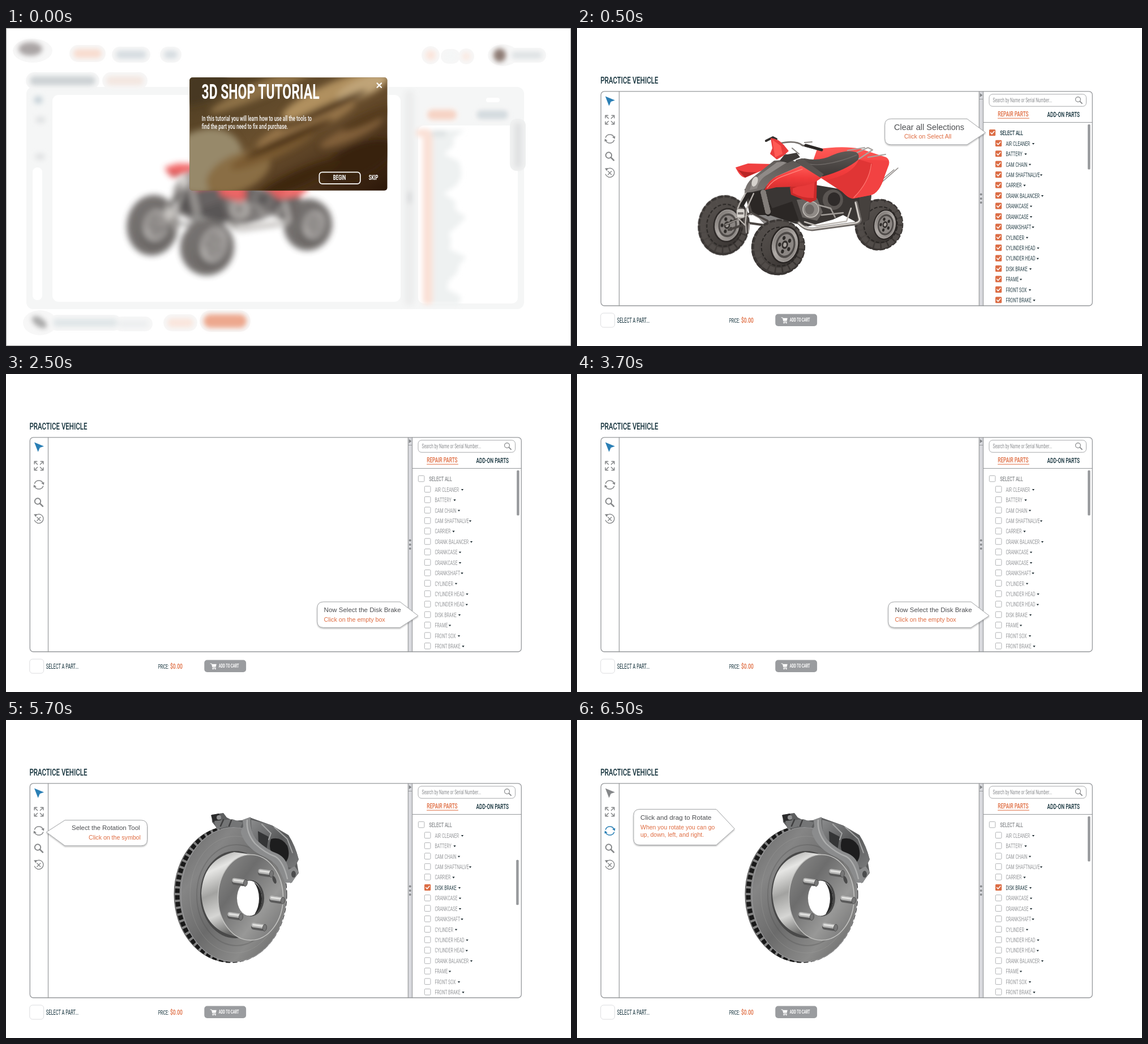
These frames come from a looping animation (998x561 px, 8 s). An HTML page:

```html
<!DOCTYPE html>
<html lang="en">
<head>
<meta charset="utf-8">
<title>3D shop tutorial</title>
<style>
html, body { margin: 0; width: 100%; height: 100%; overflow: hidden; background: #fff; }
svg { display: block; width: 100vw; height: 100vh; }
text { font-family: "Liberation Sans", Arial, sans-serif; white-space: pre; }
.slim, .mid, .bold { font-family: Roboto, "Open Sans", sans-serif; }
.mid { font-weight: 500; }
.bold { font-weight: 700; }
</style>
</head>
<body>
<svg id="stage" viewBox="0 0 998 561" preserveAspectRatio="none"></svg>
<script>
const LOOP = 8000;
const CUTS = [0, 500, 2500, 4500, 6500];
const INK = '#12303a', GRAY = '#96989b', LINE = '#97999c', ORANGE = '#df6c41', BLUE = '#2a7fb5';
const NARROW = { slim: .6, mid: .66, bold: .63 };   // condensed cuts of one face

const text = (x, y, size, str, fill, face = '') => {
  const k = NARROW[face] || 1;
  return `<text class="${face}" transform="translate(${x} ${y}) scale(${k} 1)" font-size="${size}" fill="${fill}">${str}</text>`;
};
const rect = (x, y, w, h, r, fill, stroke = 'none', sw = 1) =>
  `<rect x="${x}" y="${y}" width="${w}" height="${h}" rx="${r}" fill="${fill}" stroke="${stroke}" stroke-width="${sw}"/>`;
const oval = (cx, cy, rx, ry, fill, extra = '') =>
  `<ellipse cx="${cx}" cy="${cy}" rx="${rx}" ry="${ry}" fill="${fill}" ${extra}/>`;
const shape = (d, fill, extra = '') => `<path d="${d}" fill="${fill}" ${extra}/>`;
const line = (d, color, w = 1, extra = '') =>
  `<path d="${d}" fill="none" stroke="${color}" stroke-width="${w}" stroke-linecap="round" stroke-linejoin="round" ${extra}/>`;
const group = (body, attrs = '') => `<g ${attrs}>${body}</g>`;
const grad = (id, dir, ...stops) =>
  `<linearGradient id="${id}" ${dir}>${stops.map((c, i) =>
    `<stop offset="${i / (stops.length - 1)}" stop-color="${c}"/>`).join('')}</linearGradient>`;
const blur = (id, s) =>
  `<filter id="${id}" x="-50%" y="-50%" width="200%" height="200%"><feGaussianBlur stdDeviation="${s}"/></filter>`;

// ---------- quad bike ----------
function wheel(cx, cy, rx, ry, tilt, dx, dy, hx, hy) {
  const ring = (k, w, dash, c) =>
    oval(cx + dx * (1 - k), cy + dy * (1 - k), rx * k, ry * k, 'none',
      `stroke="${c}" stroke-width="${w}" stroke-dasharray="${dash}"`);
  const x = cx + dx, y = cy + dy;
  let spokes = '';
  for (let i = 0; i < 5; i++) {
    const a = i * Math.PI * .4 + .5;
    spokes += oval(x + Math.cos(a) * hx * .42, y + Math.sin(a) * hy * .42, hx * .12, hy * .12, '#2d2a28');
  }
  return group(
    oval(cx, cy, rx, ry, 'url(#rubber)') +
    ring(.96, 5, '9 3', '#3b3735') + ring(.84, 9, '10 2.5', '#514c49') + ring(.7, 2, '6 3', '#2a2725') +
    oval(x, y, hx * 1.16, hy * 1.12, '#2b2725') +
    oval(x, y, hx, hy, 'url(#rim)', 'stroke="#a8a3a0" stroke-width="1.4"') +
    oval(x + 1, y, hx * .78, hy * .78, '#4e4a48') +
    oval(x + 1, y, hx * .64, hy * .64, '#8b8683') + spokes +
    oval(x, y, hx * .25, hy * .25, '#34302e') + oval(x, y, hx * .13, hy * .13, '#aaa5a1'),
    `transform="rotate(${tilt} ${cx} ${cy})"`);
}

const quad =
  line('M567 247L528 281M560 250L520 283', '#8d8885', 1.6) +
  wheel(259, 348, 45, 53, 8, 6, -1, 21, 27) +
  wheel(533, 347, 42, 45, 10, 11, -2, 18, 24) +
  // frame and engine
  shape('M296 284L380 270L470 285L520 295L516 338L500 346L470 330L452 338L408 350L385 345L340 330L305 330Z', '#3a3634') +
  shape('M498 296L520 294L514 338L502 347L492 343L500 320Z', '#46413e') +
  shape('M300 292L330 286L345 318L380 306L392 340L330 345L308 322Z', '#1f1c1b', 'opacity=".55"') +
  oval(452, 303, 18, 18, '#5a5552') + oval(454, 302, 11, 12, '#2f2b2a') +
  shape('M388 303L424 300L434 325L424 340L398 334Z', '#6a6562') +
  oval(413, 320, 14, 14, '#8f8a86', 'stroke="#c1bcb7" stroke-width="1.5"') + oval(411, 320, 8, 9, '#6d6865') +
  line('M425 312L448 318L456 334M432 330L470 326', '#a19c98', 2.5) +
  line('M392 344Q404 357 418 355L492 345Q503 342 499 334L493 308', '#6f6a67', 6) +
  line('M392 344Q404 356 418 354L492 344Q502 341 498 334L492 308', '#d6d1cc', 2.6) +
  line('M402 342L424 349L476 341L484 318', '#c0bbb6', 2.5) +
  // suspension and bumper
  line('M262 347L308 326L336 340L362 372M268 356L304 344L332 348M308 326L298 292', '#4a4542', 4) +
  line('M262 347L308 328L334 342', '#9b9692', 1.4) +
  line('M329 290L338 327', '#24211f', 10) + line('M329 290L338 327', '#827d79', 10, 'stroke-dasharray="1.4 3.4" stroke-linecap="butt"') +
  line('M303 292L291 313', '#2a2725', 7) +
  line('M303 284Q291 300 284 318L283 334L297 348L300 318L312 292', '#b9b4af', 2.4) +
  rect(282, 319, 14, 16, 3, '#d9d5d0', '#8d8885') + rect(284, 325, 10, 4, 1, '#77726f') +
  line('M298 347L299 361M304 345L303 360', '#a8a39f', 2) +
  // rear bodywork
  shape('M424 214Q468 207 500 213L546 228Q553 232 551 241L543 262Q534 292 518 295L487 301Q478 300 470 290L430 264L410 254Z', 'url(#red)') +
  shape('M498 232L551 234L543 262Q534 292 518 295L487 301Q476 298 466 286L462 270Q488 258 498 232Z', '#f24242') +
  shape('M498 232L522 239Q516 270 487 301Q474 296 464 284L440 268Q486 260 498 232Z', '#e03535') +
  line('M520 240Q516 272 489 299', '#ff7771', 1.3) +
  line('M490 222L514 211L522 215L498 231M478 216L508 211M514 228L545 223', '#a9a4a0', 2.2) +
  shape('M384 237Q388 230 402 230Q428 236 452 224Q476 214 493 219Q501 224 496 233Q476 250 434 262Q420 258 411 249Q396 245 384 237Z', 'url(#seat)') +
  line('M390 234Q412 244 438 240Q466 236 494 224', '#6e6966', 1.4) +
  // front bodywork
  shape('M376 281L424 260L423 303L412 308L378 294Z', '#c92a2a') +
  shape('M381 283L420 268L418 300Q396 300 381 291Z', '#e83a3a') +
  shape('M280 246L302 239L346 240L330 250L297 264Q288 263 280 246Z', '#f04040') +
  shape('M284 250L297 264L318 254Q298 256 284 250Z', '#b92626') +
  shape('M348 234L378 232L398 242L352 262Q339 270 331 284L311 289L296 291Q297 274 314 261Z', 'url(#hood)') +
  shape('M353 237L374 235L338 258Q322 266 318 283L305 286Q308 270 322 260Z', '#8f8a87') +
  oval(314, 271, 5, 9, '#d6d2cd', 'transform="rotate(20 314 271)"') +
  shape('M331 286Q338 268 354 261L396 243L424 256L432 264Q416 278 388 280L352 281Z', 'url(#red)') +
  line('M336 282Q346 268 362 262L398 249', '#ff8079', 1.4) +
  shape('M386 233L398 230L436 258L430 264L398 244Z', '#595451') +
  // controls
  line('M356 204Q386 197 398 207L424 213', '#77726e', 3) + line('M404 207L432 215', '#2c2826', 5) +
  line('M334 199L346 193L352 196', '#33302e', 4) +
  line('M380 212L392 222M366 222L384 230M402 202L415 201', '#8a8581', 2) +
  shape('M342 194Q355 195 365 206L374 217L365 225L353 232L341 222L345 212Z', '#ea3c3c') +
  shape('M345 197L360 208L363 222L350 228L347 212Z', '#ff5a54') +
  shape('M366 224L388 220L394 228L372 238L358 234Z', '#3e3a38') +
  wheel(355, 387, 47, 49, 12, 11, -7, 22, 30);

// ---------- disc and caliper ----------
function stud(x, y) {
  return group(rect(-13, -6, 25, 12, 5, '#5a5a5a') + rect(-13, -6, 24, 8, 4, '#b5b5b4') +
    rect(-11, -4, 20, 3, 1.5, '#e2e2e0') + oval(11, 0, 3.5, 6, '#777', 'stroke="#484848" stroke-width=".8"'),
    `transform="translate(${x} ${y}) rotate(8)"`);
}
const disc =
  oval(394, 307.5, 97, 119.5, '#838383', 'stroke="#555" stroke-width="1"') +
  oval(397.5, 307.5, 95, 117, 'none', 'stroke="#191919" stroke-width="8" stroke-dasharray="8 4"') +
  // caliper body behind the rotor face
  shape('M363 167L384 164L390 172L402 178L424 176L431 172L470 186L499 203Q511 222 517 246L514 252L517 270L503 288L480 270L440 240L400 200L372 190L364 180Z', '#5d5e5f') +
  shape('M362 168L376 165L380 180L366 180Z', '#2b2b2c') +
  oval(402, 308, 93, 118.5, 'url(#steel)', 'stroke="#98989a" stroke-width="1.2"') +
  oval(405, 308, 80, 103, 'none', 'stroke="#a3a3a2" stroke-width="1" opacity=".35"') +
  oval(407, 309, 70, 89, 'none', 'stroke="#454545" stroke-width="2" opacity=".25"') +
  // hub
  oval(405, 308, 62, 77, '#494949') +
  shape('M403 233Q348 246 345 306Q348 368 402 381L432 388.5V237Z', 'url(#hub)') +
  oval(432, 313, 57.5, 75.5, 'url(#cap)', 'stroke="#c2c2c0" stroke-width="1.6"') +
  oval(432, 314.5, 24, 32, '#484848') + oval(430, 314.5, 22, 31, '#fff') +
  shape('M438 286Q452 296 452 315Q452 334 439 343Q447 330 447 315Q447 298 438 286Z', '#292929') +
  stud(412, 286) + stud(458, 270) + stud(478, 317) + stud(404, 346) + stud(446, 365) +
  oval(474, 282, 3, 7, '#4a4a4a', 'transform="rotate(-20 474 282)"') +
  // caliper front
  shape('M433 176L470 186L499 204Q511 222 517 246L508 262L492 258L470 240L452 228Q432 210 433 176Z', 'url(#cast)') +
  shape('M468 210Q486 205 497 222Q503 240 494 251Q480 246 468 232Q464 222 468 210Z', '#1d1d1e') +
  shape('M445 196L464 206L460 230L446 218Z', '#343536') +
  line('M452 184L468 200L464 211M474 189L497 210L506 234', '#a5a6a6', 2) +
  shape('M368 178L400 175L418 181L414 190L390 188L372 193Z', '#747576') +
  line('M384 176L379 187M398 177L394 187', '#3e3e3f', 2.5) +
  shape('M418 176L432 171Q430 196 443 212Q462 230 480 236Q496 244 499 264L510 258L517 268L505 287L493 287Q486 272 480 260Q470 246 449 238Q424 224 416 202Q413 196 419 188Z', '#8b8c8d') +
  line('M426 177Q424 199 440 218Q458 235 476 241Q490 250 497 280', '#adaeae', 2.4) +
  oval(508, 272, 4, 6, '#4c4d4e') + oval(376, 172, 4, 4, '#909192');

// ---------- shop screen ----------
const cursor = c => shape('M50 120.5L67 127.5L59.8 130L56.6 137.5Z', c);
const spin = c =>
  line('M50.6 193Q52.5 188 58 188Q63 188 65 192M65.6 198Q63.5 203 58 203Q53 203 51 199', c, 1.6) +
  shape('M62.2 192.4L67.4 190.8L67 195.8Z', c) + shape('M53.8 198.6L48.6 200.2L49 195.2Z', c);
const lens = (x, y, r, w, reach) =>
  `<circle cx="${x}" cy="${y}" r="${r}" fill="none" stroke="#858789" stroke-width="${w}"/>` +
  line(`M${x + r * .75} ${y + r * .75}l${reach} ${reach}`, '#858789', w * 1.4);
const corners = [[-1, -1], [1, -1], [-1, 1], [1, 1]].map(([a, b]) => line(
  `M${58 + a * 2.5} ${162 + b * 2.5}L${58 + a * 7.5} ${162 + b * 7.5}M${58 + a * 3.2} ${162 + b * 7.7}H${58 + a * 7.8}V${162 + b * 3.2}`,
  '#858789', 1.5)).join('');

const shop =
  text(41.5, 98, 17.4, 'PRACTICE VEHICLE', INK, 'mid') +
  rect(710, 112, 7.5, 378, 0, '#d9dade') +
  line('M74.5 112V490M710.3 112V490M717.5 112V490M717.5 166.5H910', LINE, 1.2) +
  line('M710.5 125.5H717', LINE, 1) + shape('M711.8 115L716.2 118.5L711.8 122Z', '#7f8184') +
  [293.5, 301, 308].map(y => oval(713.7, y, 1.9, 1.9, '#85878a')).join('') +
  rect(42.3, 111.8, 868, 378.2, 6, 'none', LINE, 1.3) +
  corners + lens(56, 224.5, 5.2, 1.9, 5) +
  line('M51.5 250.5A8 8 0 1 1 50.4 258M54.8 252.8l6 6m0-6l-6 6', '#858789', 1.3) +
  shape('M49 247.5L54.5 247L53 252.3Z', '#858789') +
  rect(728, 116.8, 171.5, 21.4, 6, '#fff', '#a7a9ab') +
  text(734.5, 131, 11.1, 'Search by Name or Serial Number...', '#8b8d90', 'slim') +
  lens(885, 126, 4.4, 1.2, 3.8) +
  text(743.3, 156, 12.5, 'REPAIR PARTS', ORANGE, 'mid') + line('M743.5 159.2H798.5', ORANGE, 1) +
  text(830.6, 157, 12.5, 'ADD-ON PARTS', INK, 'mid') +
  rect(41.8, 503, 24.8, 25, 5, '#fff', '#dcdddf') +
  text(70.8, 520, 12.4, 'SELECT A PART...', INK, 'slim') +
  text(268.8, 520, 10.4, 'PRICE:', INK, 'slim') + text(290, 520, 13, '$0.00', ORANGE, 'mid') +
  rect(350.3, 504.6, 73.8, 21.4, 5, '#9a9c9f') +
  line('M361 511H363.2L365 517.6H370.4M364.6 519.6H370.6', '#fff', 1) + shape('M363.6 511.8H371.8L370.6 516.4H365Z', '#fff') +
  oval(365.6, 520.2, 1, 1, '#fff') + oval(369.8, 520.2, 1, 1, '#fff') +
  text(375.8, 518.4, 9, 'ADD TO CART', '#fff', 'bold');

// label and x of its arrow
const PARTS = [['AIR CLEANER', 806], ['BATTERY', 792.5], ['CAM CHAIN', 800], ['CAM SHAFTNALVE', 820], ['CARRIER', 790.5],
  ['CRANK BALANCER', 822], ['CRANKCASE', 802], ['CRANKCASE', 802], ['CRANKSHAFT', 805.5], ['CYLINDER', 795],
  ['CYLINDER HEAD', 814.5], ['CYLINDER HEAD', 813.8], ['DISK BRAKE', 801], ['FRAME', 784], ['FRONT SOX', 800], ['FRONT BRAKE', 807.5]];
const swapped = PARTS.slice();
[swapped[5], swapped[12]] = [PARTS[12], PARTS[5]];

const box = (x, y, on) => on
  ? rect(x - 5.6, y - 5.6, 11.2, 11.2, 1.5, '#dc6d45') + line(`M${x - 3} ${y}l2.2 2.4l4.2-4.8`, '#fff', 1.5)
  : rect(x - 5.3, y - 5.3, 10.6, 10.6, 1.5, '#fff', '#b0b2b4');
const list = (items, all, isOn) =>
  box(733.6, 184.6, all) + text(747.3, 188.8, 11.2, 'SELECT ALL', all ? INK : '#85888b', 'mid') +
  items.map(([name, x], i) => {
    const y = 203.3 + i * 18.43, on = isOn(i);
    return box(744.6, y, on) + text(757.4, y + 4.4, 11.7, name, on ? '#2b444c' : GRAY, 'slim') +
      shape(`M${x - 2.2} ${y - .4}h4.4l-2.2 2.8z`, '#1d2b30');
  }).join('');
const bar = (x, y) => rect(x, y, 4.4, 79.5, 1.5, '#97999c');

function tip(flat, neck, top, end, px, py, lines) {
  const d = Math.sign(neck - flat) * 11, r = 11;
  return shape(`M${neck} ${top}H${flat + d}Q${flat} ${top} ${flat} ${top + r}V${end - r}Q${flat} ${end} ${flat + d} ${end}H${neck}L${px} ${py}Z`,
    '#fff', 'stroke="#a3a5a7" stroke-width="1" stroke-linejoin="round" filter="url(#drop)"') +
    lines.map(([x, y, size, str], i) => text(x, y, size, str, i ? ORANGE : '#4c4e51')).join('');
}

// ---------- opening screen ----------
// centre x, centre y, width, height, tone
const BLOBS = [
  [144, 45, 46, 12, '#f8dccf'], [221, 47, 50, 10, '#d5dce0'], [291, 47, 20, 10, '#d5dce0'],
  [750, 48, 14, 14, '#fbe4da'], [785, 50, 16, 8, '#f4f6f6'], [813, 50, 10, 10, '#fbe8e0'],
  [920, 48, 50, 8, '#dde1e3'], [100, 93, 112, 12, '#ccd1d4'], [210, 93, 62, 12, '#f3e6e0'],
  [770, 153, 48, 14, '#f6d3c4'], [859, 153, 52, 12, '#d3dade'],
  [140, 520, 110, 10, '#dfe5e7'], [225, 522, 50, 8, '#eceeef'], [308, 520, 42, 12, '#f9e5dc'],
  [387, 517, 72, 20, '#eda88e']];
const bar2 = ([x, y, w, h, c], grow) =>
  rect(x - w / 2 - grow, y - h / 2 - grow, w + 2 * grow, h + 2 * grow, h / 2 + grow, c);

let ragged = 'M752 180';
for (let y = 180; y <= 488; y += 14) ragged += `L${794 + 14 * Math.sin(y * .08) + 8 * Math.sin(y * .19)} ${y}`;
ragged += 'L752 488Z';

const backdrop =
  rect(36, 104, 879, 392, 12, '#f5f6f6') +
  rect(82, 118, 615, 365, 11, '#fff') + rect(47, 246, 17, 234, 8, '#fff') +
  rect(728, 172, 176, 314, 10, '#fff') + rect(848, 123, 24, 8, 4, '#fff') +
  oval(47, 40, 35, 21, '#f7f7f7') + oval(60, 520, 30, 22, '#f7f7f7') + oval(878, 48, 27, 19, '#f7f7f7') +
  BLOBS.map(b => bar2([b[0], b[1], b[2], b[3], '#f7f7f7'], 9)).join('') +
  rect(890, 160, 28, 92, 12, '#f0f1f1') +
  group(
    rect(704, 110, 17, 380, 8, '#eceded') + shape(ragged, '#eef1f1') +
    rect(736, 180, 18, 308, 8, '#fae1d7') + rect(724, 178, 26, 14, 7, '#fae1d7') + rect(752, 181, 26, 11, 5, '#dfe3e4') +
    rect(898, 167, 13, 80, 6, '#e0e1e2') + rect(709, 288, 8, 22, 4, '#d9dadc') +
    oval(57, 127, 8, 7, '#c9d4da') + oval(61, 162, 9, 6, '#e0e2e3') + oval(60, 227, 9, 6, '#e0e2e3') +
    oval(43, 37, 21, 12, '#aaa5a5') + oval(872, 48, 11, 12, '#8d7c75') +
    oval(59, 519, 15, 8, '#aaa', 'transform="rotate(35 59 519)"') +
    BLOBS.map(b => bar2(b, 2)).join(''), 'filter="url(#soft)"') +
  '<use href="#quad" filter="url(#haze)" opacity=".78"/>' +
  rect(.5, .5, 997, 560, 0, 'none', '#a2a2a2');

// x, y, rx, ry, tone of the dust clouds
const DUST = [
  [350, 235, 70, 55, '#97896b'], [410, 255, 60, 32, '#8a6e45'], [470, 100, 120, 14, '#8d7146'],
  [575, 118, 95, 20, '#b0905f'], [630, 105, 50, 16, '#c0a478'], [530, 170, 95, 17, '#96754a'],
  [470, 215, 80, 14, '#7c5b32'], [610, 185, 60, 12, '#82603a'], [560, 145, 85, 7, '#51381c'],
  [500, 195, 85, 7, '#4b3116'], [640, 160, 50, 9, '#553a1d'], [620, 235, 70, 28, '#38200e'],
  [520, 265, 80, 14, '#3d2611'], [345, 105, 50, 24, '#463922']];
const modal =
  group(rect(324, 87, 350, 200, 0, 'url(#dust)') +
    group(DUST.map(([x, y, a, b, c]) => oval(x, y, a, b, c, `transform="rotate(-24 ${x} ${y})"`)).join(''), 'filter="url(#smoke)"'),
    'clip-path="url(#card)"') +
  text(345.5, 124.5, 36.4, '3D SHOP TUTORIAL', '#fff', 'bold') +
  text(345.8, 164.3, 12.3, 'In this tutorial you will learn how to use all the tools to', '#fff', 'mid') +
  text(345.8, 178.2, 12.3, 'find the part you need to fix and purchase.', '#fff', 'mid') +
  line('M655.6 97.4l7.4 7.4m0-7.4l-7.4 7.4', '#fff', 2.2) +
  rect(553.4, 254.4, 72.4, 20.4, 5, 'none', '#fff', 1.7) +
  text(577.8, 268.4, 12.4, 'BEGIN', '#fff', 'bold') + text(640.8, 268.4, 12.1, 'SKIP', '#fff', 'bold');

const defs = '<defs>' +
  blur('soft', 4) + blur('haze', 5.5) + blur('smoke', 6) +
  '<filter id="drop" x="-10%" y="-20%" width="120%" height="150%"><feDropShadow dx="0" dy="1.5" stdDeviation="1.3" flood-opacity=".28"/></filter>' +
  '<clipPath id="card"><rect x="324.3" y="87.2" width="349.2" height="199.6" rx="5"/></clipPath>' +
  grad('rubber', 'x1="0" y1="0" x2="1" y2="1"', '#5b5653', '#4a4542', '#2c2826') +
  grad('rim', 'x1="0" y1="0" x2="1" y2="1"', '#6b6663', '#b0aba7', '#7b7673') +
  grad('red', 'x1="0" y1="0" x2="0" y2="1"', '#ff5b57', '#f13b3b', '#d42f2f') +
  grad('seat', 'x1="0" y1="0" x2="0" y2="1"', '#5f5a57', '#3b3735') +
  grad('hood', 'x1="0" y1="1" x2="1" y2="0"', '#7d7875', '#5a5552') +
  grad('steel', 'x1="0" y1="0" x2="1" y2="1"', '#686868', '#858585', '#6b6b6b', '#8b8b8a', '#5d5d5d') +
  grad('hub', 'x1="0" y1="0" x2=".25" y2="1"', '#8a8a89', '#e6e6e4', '#a2a2a0', '#d6d6d4', '#6b6b6a') +
  grad('cap', 'x1="0" y1="0" x2="1" y2="1"', '#8d8d8c', '#6d6d6d', '#989897', '#6f6f6f') +
  grad('cast', 'x1="0" y1="0" x2="1" y2="1"', '#8a8b8c', '#58595a', '#7a7b7c') +
  grad('dust', 'x1="0" y1="0" x2="1" y2="1"', '#4a3a20', '#6d5230', '#2b1608') +
  group(quad, 'id="quad"') + '</defs>';

// each layer lists the steps in which it shows
const LAYERS = [
  [[0], backdrop + modal],
  [[1, 2, 3, 4], shop],
  [[1, 2, 3], cursor(BLUE) + spin('#858789')],
  [[4], cursor('#858789') + spin(BLUE)],
  [[1, 2, 4], bar(902.2, 170)],
  [[3], bar(901.2, 246.8)],
  [[1], list(PARTS, true, () => true) + '<use href="#quad"/>' +
    tip(543.8, 689, 160.3, 205.8, 721.5, 184.5, [[560, 179.6, 14.5, 'Clear all Selections'], [578, 195.3, 10.5, 'Click on Select All']])],
  [[2], list(PARTS, false, () => false) +
    tip(549.8, 696, 402, 447.3, 728, 426.5, [[561.6, 420, 11.5, 'Now Select the Disk Brake'], [561.6, 437, 10.7, 'Click on the empty box']])],
  [[3, 4], list(swapped, false, i => i === 5) + disc],
  [[3], tip(249.5, 104, 176.8, 221.8, 71.3, 197.8, [[116, 194.3, 11.45, 'Select the Rotation Tool'], [146, 211.2, 10.6, 'Click on the symbol']])],
  [[4], tip(100, 246, 157.5, 220.5, 278.3, 192, [[112, 176.3, 11.7, 'Click and drag to Rotate'],
    [112, 193, 10.5, 'When you rotate you can go'], [112, 205.6, 10.5, 'up, down, left, and right.']])]
];

const stage = document.getElementById('stage');
stage.innerHTML = defs + LAYERS.map(([, body]) => group(body, 'class="layer"')).join('');
stage.querySelectorAll('.layer').forEach((el, n) => {
  const steps = LAYERS[n][0];
  const frames = CUTS.map((ms, i) => ({ opacity: steps.includes(i) ? 1 : 0, offset: ms / LOOP, easing: 'steps(1, end)' }));
  frames.push({ opacity: frames[frames.length - 1].opacity, offset: 1 });
  el.animate(frames, { duration: LOOP, iterations: Infinity });
});
</script>
</body>
</html>
```
